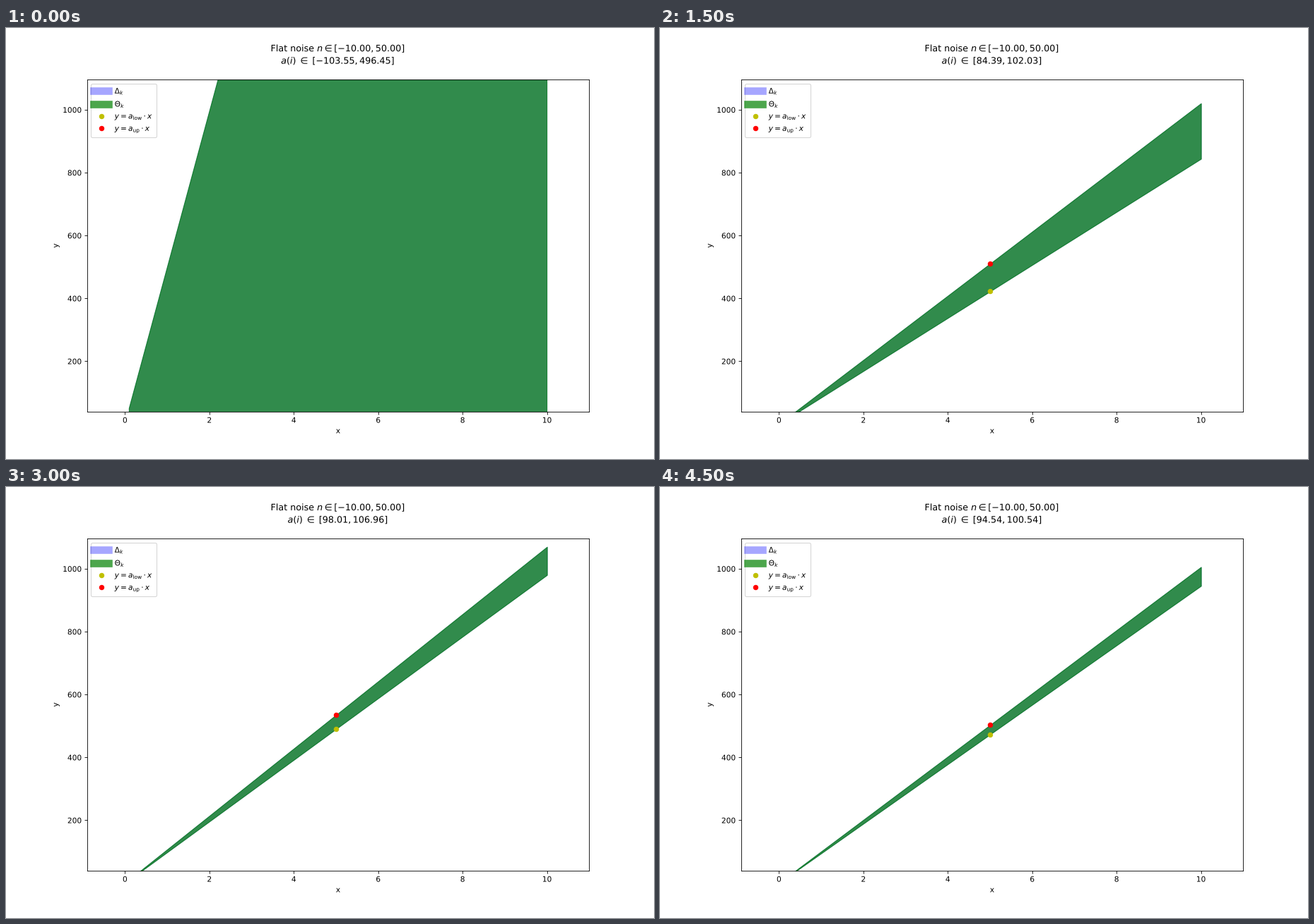
A matplotlib script that plays this animation: 917 by 611 pixels, repeating every 5 s.

```python
import numpy as np
import matplotlib.pyplot as plt
from matplotlib.animation import FuncAnimation
from matplotlib.patheffects import Normal
from matplotlib.text import Text

W, H = 917, 611
DPI = 76.4
N_LOW, N_UP = -10, 50
STEPS = 10
X0, X1, X_MARK = 0.1, 10, 5

plt.rcParams["font.family"] = "DejaVu Sans"
plt.rcParams["text.hinting"] = "no_hinting"

# Slope bounds: each measurement at x leaves an interval of width 60 / x.
xs = np.linspace(X0, X1, STEPS)
low = np.array([-103.55, 74.12, 73.61, 84.386, 91.87,
                89.68, 98.008, 96.31, 99.39, 94.54])
up = low + (N_UP - N_LOW) / xs
ys = low * xs + N_UP

fig, ax = plt.subplots(figsize=(W / DPI + 1e-9, H / DPI + 1e-9), dpi=DPI)
fig.subplots_adjust(left=0.125, right=0.9, bottom=0.11, top=0.88)
ax.set_xlim(X0 - 1, X1 + 1)
ax.set_ylim(ys[0], ys[-1] + 100)
ax.set_xticks(range(0, 11, 2))
ax.set_yticks(range(200, 1001, 200))
ax.set_xlabel("x")
ax.set_ylabel("y")


def title_line(baseline, text):
    return fig.text(0.5125, 1 - baseline / H, text, size=12,
                    ha="center", va="baseline")


title_line(33.1, rf"Flat noise $n \in [{N_LOW:.2f}, {N_UP:.2f}]$")
bounds = title_line(50.6, "")


def region(color, alpha, label):
    ax.plot([], [], color=color, alpha=alpha, lw=10, label=label)
    return ax.fill_between([X0, X1], 0, 1, color=color, alpha=alpha)


regions = [region("b", 0.35, r"$\Delta_k$"), region("g", 0.7, r"$\Theta_k$")]
low_dot, = ax.plot([], [], "yo", label=r"$y = a_{\mathrm{low}} \cdot x$")
up_dot, = ax.plot([], [], "ro", label=r"$y = a_{\mathrm{up}} \cdot x$")
ax.legend(loc="upper left", labelspacing=0.45, borderpad=0.38)

# A path effect draws text as outlines, free of whole-pixel rounding.
for label in fig.findobj(Text):
    label.set_path_effects([Normal()])


def update(k):
    a, b = low[k], up[k]
    wedge = [(X0, a * X0), (X1, a * X1), (X1, b * X1), (X0, b * X0)]
    for r in regions:
        r.set_verts([wedge])
    low_dot.set_data([X_MARK], [a * X_MARK])
    up_dot.set_data([X_MARK], [b * X_MARK])
    bounds.set_text(rf"$a(i)\;\in\;[{a:.2f}, {b:.2f}]$")
    return [*regions, low_dot, up_dot, bounds]


anim = FuncAnimation(fig, update, frames=STEPS, interval=500,
                     init_func=lambda: update(0), repeat=True, blit=False)
plt.show()
```
